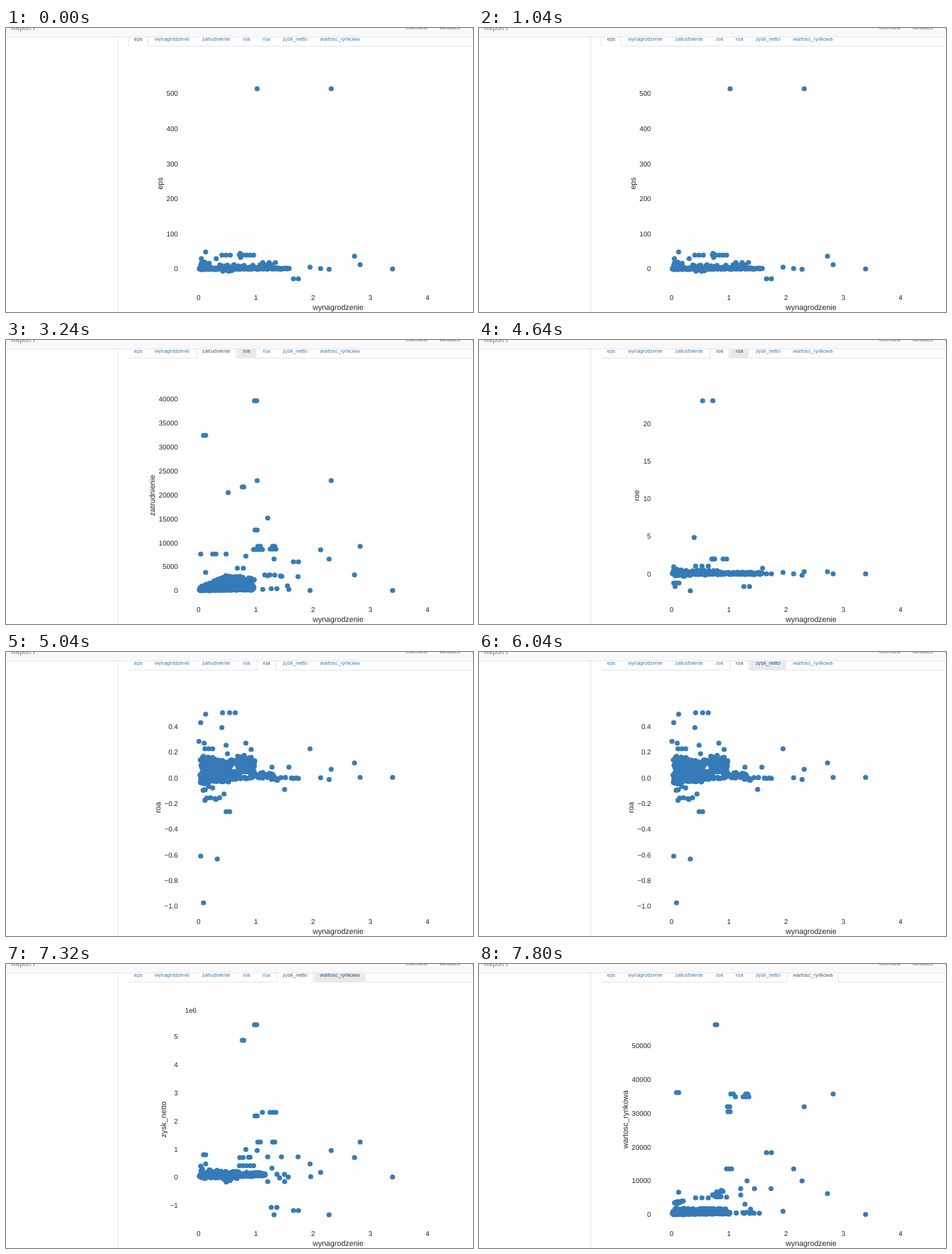
An HTML page for the animation above (8000 ms loop, 662 px wide and 402 px high).

```html
<!DOCTYPE html>
<html lang="pl">
<head>
<meta charset="utf-8">
<title>Report</title>
<style>
  html, body { margin: 0; width: 100%; height: 100%; overflow: hidden; background: #fefefe; }
  svg { display: block; width: 662px; height: 402px; font-family: "Liberation Sans", Arial, sans-serif; text-rendering: geometricPrecision; }
  .tab text { font-size: 7.32px; fill: #337ab7; text-anchor: middle; }
  .tab path { fill: none; stroke: none; }
  .tab.hover path { fill: #e9e9eb; }
  .tab.hover text { fill: #23527c; }
  .tab.active path { fill: #fefefe; stroke: #e4e4e6; }
  .tab.active text { fill: #555; }
  .plot { visibility: hidden; }
  .plot.active { visibility: visible; }
  .tick { font-size: 9.8px; fill: #262626; }
  .label { font-size: 10.7px; fill: #262626; text-anchor: middle; }
  .nav { font-size: 7.3px; fill: #777; }
  circle { fill: #367bb8; }
</style>
</head>
<body>
<svg id="stage" viewBox="0 0 662 402"></svg>
<script>
const LOOP = 8000;
const stage = document.getElementById("stage");

// [time, active tab, hovered tab]
const steps = [
  [0, "eps"], [1960, "eps", "zatrudnienie"], [2400, "zatrudnienie"], [3120, "zatrudnienie", "roe"],
  [3600, "roe"], [4600, "roe", "roa"], [5040, "roa"], [5800, "roa", "zysk_netto"],
  [6200, "zysk_netto"], [7000, "zysk_netto", "wartosc_rynkowa"], [7440, "wartosc_rynkowa"]
];

// Tab name and centre; the padded text gives the width.
const tabs = {
  eps: 187.5, wynagrodzenie: 235.5, zatrudnienie: 298, roe: 341.2, roa: 369.2, zysk_netto: 409.7, wartosc_rynkowa: 473.2
};

// Companies that stand out in several plots: [x, dots, gap]
const companies = [
  [548], [502], [494], [461], [458], [446], [431], [407.5, 2, 7],
  [335, 2, 2], [352.3, 2], [353, 2], [280, 2], [357, 2, 3.5], [378, 2], [374.5, 3, 4], [363.5], [380], [371], [376, 2, 8]
];

// ticks: first value, step, count, y of first, y step, decimals
// heights: y of each company in turn
// clouds: x0, x1, top0, top1, bottom0, bottom1, dots
// rows: y, x, dots, gap
const plots = {
  eps: {
    ticks: [0, 100, 6, 341, -49.6, 0],
    heights: [341, 335, 323, 86, 341.5, 340.5, 338.5, 355],
    clouds: [[274, 402, 339, 340, 342, 341, 140], [276, 288, 330, 332, 340, 340, 12], [300, 383, 334, 335, 340, 340, 26],
      [306, 323, 342, 342, 345, 345, 6], [330, 334, 317, 320, 325, 326, 4]],
    rows: [[86, 356], [317, 283], [326.5, 277, 2, 21], [321.5, 306, 3, 6], [321.5, 336, 4, 5], [332, 364, 3, 9]]
  },
  zatrudnienie: {
    ticks: [0, 5000, 9, 355, -33.86, 0],
    heights: [354.5, 292, 332.5, 199, 310, 297, 354.5, 314, 208, 86, 269, 135, 292, 292, 296, 296.5, 310, 252, 352],
    clouds: [[274, 350, 351, 351, 355, 354, 130], [276, 313, 349, 332, 353, 352, 85], [311, 352, 331, 338, 353, 352, 105],
      [361, 396, 331, 334, 334, 335, 6]],
    rows: [[199, 356], [216, 315], [296.5, 351, 3, 4], [303, 276], [303, 293, 2, 4.5], [303, 312], [306, 340],
      [323, 328, 2, 8.5], [329, 283], [335, 414], [348, 399], [353, 364, 2, 37]]
  },
  roe: {
    ticks: [0, 5, 5, 331.3, -53.2, 0],
    heights: [331, 331, 328, 328, 333, 331, 329, 331],
    clouds: [[274, 402, 328, 329, 332, 332, 140], [275, 300, 323, 326, 335, 334, 26], [300, 345, 325, 326, 333, 333, 24]],
    rows: [[86, 317, 2, 14.5], [279.5, 305], [310, 330, 3, 2], [310, 346, 2, 5], [321, 276], [320, 307, 3, 9],
      [323, 402], [344, 276, 3, 3.7], [349, 278], [355, 299.5], [349, 375.5, 2, 8]]
  },
  roa: {
    ticks: [-1, 0.2, 8, 360, -36.33, 1],
    heights: [177.5, 177.5, 157, 166, 180.5, 178, 137, 179],
    clouds: [[275, 320, 151, 154, 187, 184, 175], [278, 296, 147, 149, 155, 155, 10], [318, 353, 150, 153, 182, 178, 95],
      [326, 350, 143, 147, 152, 153, 9], [350, 386, 169, 173, 177, 182, 28], [277, 293, 189, 190, 196, 196, 4],
      [279, 306, 206, 206, 211, 209, 6], [388, 416, 176, 176, 180, 180, 4]],
    rows: [[86, 307], [86, 317, 2, 8], [88, 283], [100, 276], [107, 306], [126.5, 273.5], [129, 281, 2, 59], [137, 282, 3, 5.5],
      [132, 312], [138, 347.5], [144, 314], [163, 377, 2, 24], [194.5, 395], [201, 309], [226, 312, 2, 5], [289, 276], [293, 299.5], [355, 280]]
  },
  zysk_netto: {
    ticks: [-1, 1, 7, 341.8, -39.77, 0], offset: "1e6",
    heights: [301.5, 252, 274, 264, 355, 295, 283, 349, 108, 86, 215, 270, 252, 252, 210, 210, 355, 273, 344.5],
    clouds: [[274, 368, 298, 297, 302, 300, 120], [276, 330, 290, 293, 304, 304, 60], [310, 319, 304, 304, 310, 310, 6],
      [333, 363, 294, 295, 302, 300, 18], [383, 402, 296, 297, 303, 303, 4]],
    rows: [[262.5, 340], [264, 356], [274, 331.5, 2, 4.5], [273.5, 344, 2, 2], [273, 390.5, 2, 23.5],
      [283, 283], [286, 276], [285.5, 331, 5, 5], [289, 377], [301, 432], [308, 371, 2, 24]]
  },
  wartosc_rynkowa: {
    ticks: [0, 10000, 6, 355, -47.9, 0],
    heights: [354.5, 184, 325, 202, 307, 290, 350, 267, 86, 202, 209, 182, 184, 184, 188, 188, 307, 318, 353],
    clouds: [[274, 356, 350, 350, 355, 354, 130], [276, 350, 345, 346, 353, 353, 80], [276, 291, 335, 335, 339, 339, 8],
      [331, 346, 324, 318, 330, 330, 12], [361, 403, 350, 352, 354, 354, 6]],
    rows: [[290, 351, 3, 3.5], [323, 283], [331, 307, 3, 9], [330, 351], [318, 390.5, 2, 23.5], [327, 371], [340, 377], [347, 385]]
  }
};

function add(parent, name, attrs, text) {
  const node = document.createElementNS("http://www.w3.org/2000/svg", name);
  for (const key in attrs) node.setAttribute(key, attrs[key]);
  if (text !== undefined) node.textContent = text;
  parent.appendChild(node);
  return node;
}

function seeded(seed) {
  return () => (seed = (seed * 16807) % 2147483647) / 2147483647;
}

const mix = (a, b, t) => a + (b - a) * t;

function drawPlot(name, { ticks, offset, heights, clouds, rows }) {
  const group = add(stage, "g", { class: "plot" });
  const dot = (cx, cy) => add(group, "circle", { cx, cy, r: 3.6 });
  const drawRow = (y, x, dots = 1, gap = 3) => {
    for (let i = 0; i < dots; i++) dot(x + i * gap, y);
  };
  const random = seeded(7919);

  for (const [x0, x1, top0, top1, bottom0, bottom1, dots] of clouds) {
    for (let i = 0; i < dots; i++) {
      const t = (i + random()) / dots;
      dot(mix(x0, x1, t), mix(mix(top0, top1, t), mix(bottom0, bottom1, t), random()));
    }
  }
  heights.forEach((y, i) => drawRow(y, ...companies[i]));
  rows.forEach(row => drawRow(...row));

  const [first, step, count, y0, dy, decimals] = ticks;
  let widest = 0;
  for (let i = 0; i < count; i++) {
    const value = Math.round((first + i * step) * 10) / 10;
    const tick = add(group, "text", { class: "tick", x: 243.8, y: y0 + i * dy + 3.3, "text-anchor": "end" },
      value.toFixed(decimals).replace("-", "−"));
    widest = Math.max(widest, tick.getComputedTextLength());
  }
  if (offset) add(group, "text", { class: "tick", x: 253.7, y: 69.4 }, offset);
  add(group, "text", { class: "label", transform: `translate(${238 - widest} 220) rotate(-90)` }, name);
  return group;
}

function drawTab(name, center) {
  const group = add(stage, "g", { class: "tab" });
  const shape = add(group, "path");
  const half = add(group, "text", { x: center, y: 18 }, name).getComputedTextLength() / 2 + 8;
  shape.setAttribute("d", `M${center - half} 26V8H${center + half}V26`);
  return group;
}

const plotNodes = Object.entries(plots).map(([name, plot]) => [name, drawPlot(name, plot)]);

for (let i = 0; i < 5; i++) {
  add(stage, "text", { class: "tick", x: 273 + i * 81.15, y: 385.3, "text-anchor": "middle" }, i);
}
add(stage, "text", { class: "label", x: 470.7, y: 398.5 }, "wynagrodzenie");

add(stage, "path", { d: "M158.5 13V402", stroke: "#e8e8ea" });
add(stage, "path", { d: "M173.5 25.5H662", stroke: "#e6e6e8" });

const tabNodes = Object.entries(tabs).map(([name, center]) => [name, drawTab(name, center)]);

add(stage, "rect", { width: 662, height: 12, fill: "#f8f8f8" });
add(stage, "path", { d: "M0 12.5H662", stroke: "#e8e8ea" });
add(stage, "text", { class: "nav", x: 7.5, y: 2.8, style: "font-size:9.4px" }, "Report I");
add(stage, "text", { class: "nav", x: 567, y: 2 }, "Overview");
add(stage, "text", { class: "nav", x: 613.8, y: 2 }, "Variables");
add(stage, "text", { class: "nav", x: 660.5, y: 2 }, "Correlations");

function render() {
  const time = performance.now() % LOOP;
  const [, active, hover] = steps.filter(step => step[0] <= time).pop();
  for (const [name, node] of tabNodes) {
    node.classList.toggle("active", name === active);
    node.classList.toggle("hover", name === hover);
  }
  for (const [name, node] of plotNodes) node.classList.toggle("active", name === active);
  requestAnimationFrame(render);
}
render();
</script>
</body>
</html>
```
